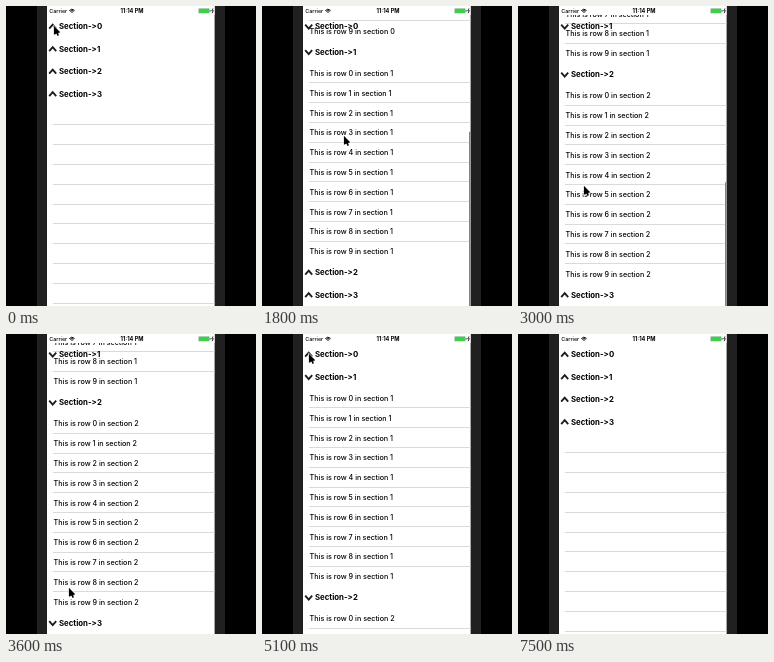
Write an HTML page with a canvas that moves like this. It is 250 by 300 pixels and loops after 7.8 s.

```html
<!DOCTYPE html>
<html lang="en">
<head>
<meta charset="utf-8">
<title>Expandable sections</title>
<style>
  html, body { margin: 0; width: 100%; height: 100%; overflow: hidden; background: #000; }
  canvas { display: block; width: 250px; height: 300px; }
</style>
</head>
<body>
<canvas id="stage" width="250" height="300"></canvas>
<script>
const ctx = document.getElementById('stage').getContext('2d');

const LOOP = 7800, STEP = 300;
const LEFT = 41, RIGHT = 208.6, TOP = 9, BOTTOM = 300;
const HEADER = 22.5, ROW = 19.8, ROWS = 10, SECTIONS = 4;
const VIEW = BOTTOM - TOP, BODY = ROW * ROWS;
const LAST_CURSOR_STEP = 23;

const openStep = [1, 3, 8, 11];
const closeStep = s => 17 + Math.round(s * 1.6);
const isOpen = (s, step) => step >= openStep[s] && step < closeStep(s);

// Eased progress from 0 to 1 between two steps
function ramp(step, from, to) {
  const p = Math.min(Math.max((step - from) / (to - from), 0), 1);
  return p * p * (3 - 2 * p);
}

// Largest scroll with the given number of open sections
const maxScroll = open => SECTIONS * HEADER + open * BODY - VIEW;

function scrollAt(step) {
  const middle = maxScroll(2), end = maxScroll(3), rest = 30.4;
  return middle * ramp(step, 4, 6)
    + (end - middle) * ramp(step, 8, 10)
    - (end - rest) * ramp(step, 12, 14)
    - rest * ramp(step, 14, 15);
}

// The pointer eases through a few stops: step, x, y
const stops = [
  [0, 48, 20], [3, 46, 241], [4, 76, 247], [6, 82, 130], [8, 45, 269],
  [10, 66, 180], [11, 46, 288], [12, 63, 254], [14, 84, 157]
];

function cursorAt(step) {
  let [, x, y] = stops[0];
  stops.slice(1).forEach(([at, nx, ny], i) => {
    const p = ramp(step, stops[i][0], at);
    x += (nx - x) * p;
    y += (ny - y) * p;
  });
  // Back to the first header, then down the list as sections close
  const back = ramp(step, 14, 16);
  x += (47 - x) * back;
  y += (20 - y) * back;
  return [x, y + HEADER * 3 * Math.min(Math.max((step - 17) / 4, 0), 1)];
}

function text(str, x, y, font, align = 'left') {
  ctx.font = font + ' Inter, "Liberation Sans", sans-serif';
  ctx.textAlign = align;
  ctx.fillStyle = '#000';
  ctx.fillText(str, x, y);
  return ctx.measureText(str).width;
}

function polyline(...points) {
  ctx.beginPath();
  points.forEach(([x, y]) => ctx.lineTo(x, y));
}

function stroke(color, width) {
  ctx.strokeStyle = color;
  ctx.lineWidth = width;
  ctx.stroke();
}

function rect(color, x, y, w, h) {
  ctx.fillStyle = color;
  ctx.fillRect(x, y, w, h);
}

const separator = y => rect('#dadadb', 47, Math.floor(y), RIGHT - 47, 1);

function drawHeader(index, top, open) {
  const mid = top + HEADER / 2 + 0.4;
  const tip = open ? 2 : -2;
  polyline([43.2, mid - tip], [46.7, mid + tip], [50.2, mid - tip]);
  stroke('#1a1a1a', 1.8);
  // Two runs, so the font does not join "->" into an arrow
  const width = text('Section-', 53, mid + 2.8, 'bold 7.8px');
  text('>' + index, 53 + width, mid + 2.8, 'bold 7.8px');
}

function drawTable(step) {
  const scroll = scrollAt(step);
  const headers = [];
  let y = TOP - scroll;

  for (let s = 0; s < SECTIONS; s++) {
    const open = isOpen(s, step);
    const top = y;
    y += HEADER;
    for (let r = 0; open && r < ROWS; r++, y += ROW) {
      text(`This is row ${r} in section ${s}`, 47.6, y + ROW / 2 + 3, '500 7.2px');
      if (r < ROWS - 1 || s === SECTIONS - 1) separator(y + ROW);
    }
    headers.push([s, Math.min(Math.max(top, TOP), y - HEADER), open]);
  }

  const content = y + scroll - TOP;
  for (y += ROW; y < BOTTOM; y += ROW) separator(y);
  headers.forEach(h => drawHeader(...h));

  if (scroll !== scrollAt(step - 1)) {
    rect('#858585', 207, TOP + scroll / content * VIEW, 1.4, VIEW * VIEW / content);
  }
}

function drawStatus() {
  rect('#fff', LEFT, 0, RIGHT - LEFT, TOP);
  text('Carrier', 43.3, 7, '500 5.4px');
  text('11:14 PM', 126, 7, 'bold 5.6px', 'center');

  for (const r of [1, 2.3, 3.6]) {
    ctx.beginPath();
    ctx.arc(66, 7, r, -Math.PI * 0.77, -Math.PI * 0.23);
    stroke('#000', 1);
  }

  rect('#999', 192.5, 2.5, 11, 4.8);
  rect('#3fcf4c', 193, 2.8, 10, 4.2);
  rect('#333', 203.8, 4, 0.7, 1.8);
  polyline([207, 2.4], [205.7, 5], [207.4, 4.6], [206.2, 7.2]);
  stroke('#111', 0.8);
}

function drawCursor(step) {
  ctx.save();
  ctx.translate(...cursorAt(step));
  for (const [color, edge] of [['#fff', 1.2], ['#000', 0.2]]) {
    polyline([2.4, 5], [4.2, 9.6]);
    stroke(color, 1.4 + edge);
    polyline([0, 0], [0, 8.6], [6.1, 6.2]);
    ctx.closePath();
    stroke(color, edge);
    ctx.fillStyle = color;
    ctx.fill();
  }
  ctx.restore();
}

function draw(step) {
  rect('#000', 0, 0, 250, 300);
  rect('#202020', 31, 0, 188, 300);
  rect('#fff', LEFT, 0, RIGHT - LEFT, 300);
  drawTable(step);
  drawStatus();
  if (step <= LAST_CURSOR_STEP) drawCursor(step);
}

const start = performance.now();
function tick() {
  draw(Math.floor((performance.now() - start) % LOOP / STEP));
  requestAnimationFrame(tick);
}
tick();
</script>
</body>
</html>
```
